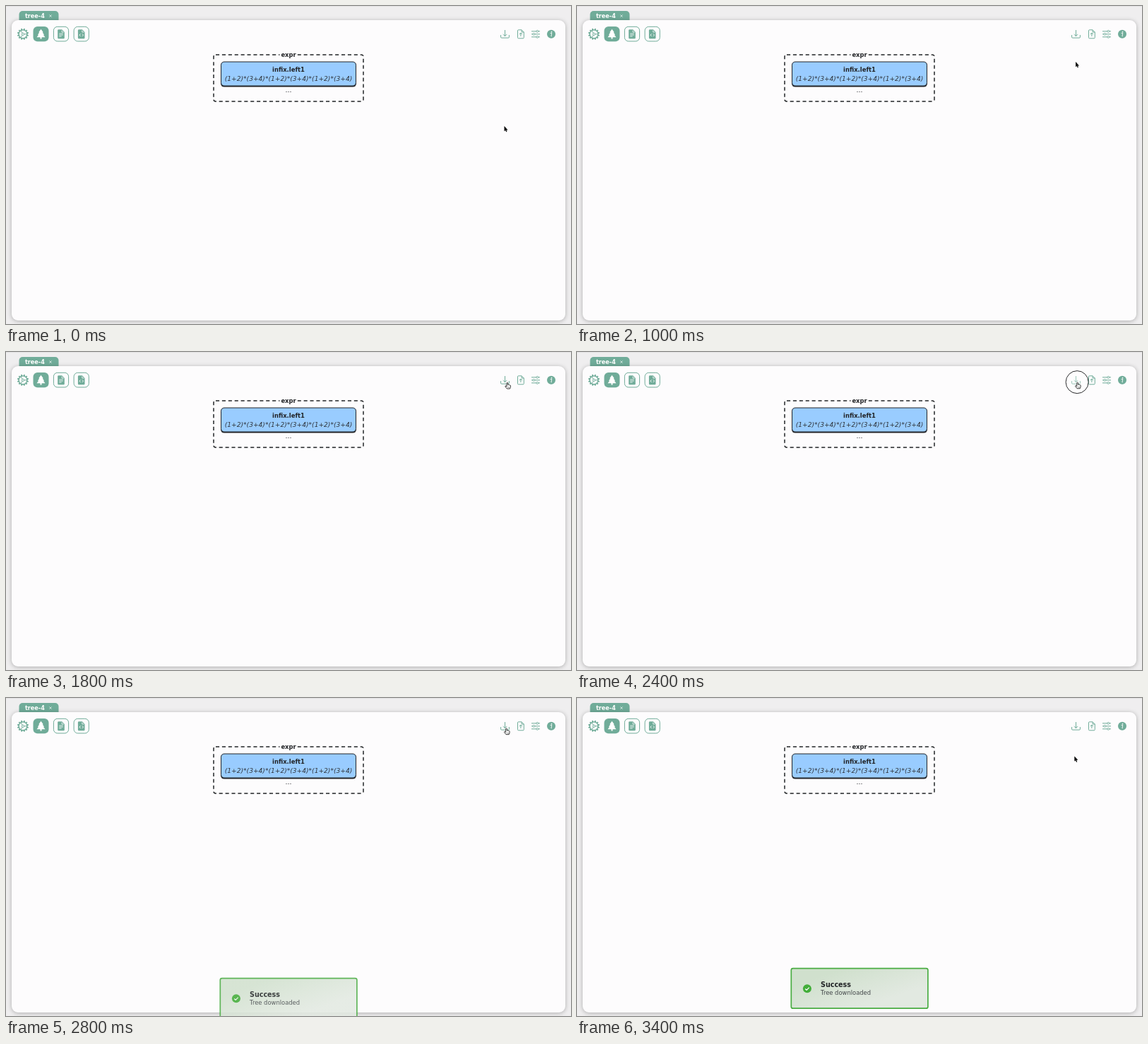
Animation, 800 px wide and 450 px high, one loop 3.7 s. Source, as an HTML page with a canvas:

```html
<!DOCTYPE html>
<html lang="en">
<head>
<meta charset="utf-8">
<title>Tree viewer</title>
<style>
  html, body { margin: 0; width: 100%; height: 100%; overflow: hidden; background: #efeeef; }
  canvas { display: block; width: 800px; height: 450px; }
</style>
</head>
<body>
<canvas id="stage"></canvas>
<script>
const W = 800, H = 450, LOOP = 3700, STEP = 100;
const GREEN = '#70ac99', INK = '#222427', PAPER = '#fdfcfd';
const FONT = '"DejaVu Sans", Verdana, sans-serif';

const canvas = document.getElementById('stage');
const dpr = window.devicePixelRatio || 1;
canvas.width = W * dpr;
canvas.height = H * dpr;
const c = canvas.getContext('2d');

function box(x, y, w, h, r, fill, stroke, lw = 1) {
  c.beginPath();
  c.roundRect(x, y, w, h, r);
  if (fill) { c.fillStyle = fill; c.fill(); }
  if (stroke) { c.strokeStyle = stroke; c.lineWidth = lw; c.stroke(); }
}

function disc(x, y, r, fill, stroke, lw = 1) {
  c.beginPath();
  c.arc(x, y, r, 0, Math.PI * 2);
  if (fill) { c.fillStyle = fill; c.fill(); }
  if (stroke) { c.strokeStyle = stroke; c.lineWidth = lw; c.stroke(); }
}

function line(color, lw, ...pts) {
  c.beginPath();
  for (let i = 0; i < pts.length; i += 2) c.lineTo(pts[i], pts[i + 1]);
  c.strokeStyle = color;
  c.lineWidth = lw;
  c.stroke();
}

function shape(path, x, y, fill, stroke, lw = 1) {
  const p = new Path2D(path);
  c.save();
  c.translate(x, y);
  if (fill) { c.fillStyle = fill; c.fill(p); }
  if (stroke) { c.strokeStyle = stroke; c.lineWidth = lw; c.stroke(p); }
  c.restore();
}

function text(str, x, y, size, color, style = '', align = 'left') {
  c.font = `${style} ${size}px ${FONT}`;
  c.textAlign = align;
  c.fillStyle = color;
  c.fillText(str, x, y);
}

// Piecewise linear track of [time, ...values]
function track(keys, t) {
  if (t <= keys[0][0]) return keys[0].slice(1);
  for (let i = 1; i < keys.length; i++) {
    const a = keys[i - 1], b = keys[i];
    if (t <= b[0]) {
      const k = (t - a[0]) / (b[0] - a[0]);
      return a.slice(1).map((v, n) => v + (b[n + 1] - v) * k);
    }
  }
  return keys[keys.length - 1].slice(1);
}

function drawWindow() {
  c.fillStyle = '#efeeef';
  c.fillRect(0, 0, W, H);
  c.fillStyle = '#e4e3e4';
  c.fillRect(0, 0, W, 1);
  box(18.5, 7, 56, 16, [5, 5, 0, 0], GREEN);
  text('tree-4', 27, 17, 8.1, '#fff', 'bold');
  line('#e8f3ef', 0.8, 61.4, 12.5, 64.6, 15.7);
  line('#e8f3ef', 0.8, 64.6, 12.5, 61.4, 15.7);
  c.save();
  c.shadowColor = 'rgba(0,0,0,.28)';
  c.shadowBlur = 6 * dpr;
  c.shadowOffsetY = dpr;
  box(8, 20, 784, 425, 9, PAPER);
  c.restore();
}

function drawGear(x, y) {
  disc(x, y, 5.9, null, GREEN, 1.4);
  for (let i = 0; i < 12; i++) {
    const a = (i + 0.5) * Math.PI / 6, u = Math.cos(a), v = Math.sin(a);
    line(GREEN, 2, x + u * 6, y + v * 6, x + u * 8, y + v * 8);
  }
  for (let i = 0; i < 3; i++) {
    const a = i * Math.PI * 2 / 3;
    line(GREEN, 1, x, y, x + Math.cos(a) * 5.6, y + Math.sin(a) * 5.6);
  }
  disc(x, y, 1.6, PAPER, GREEN, 0.9);
}

function drawFileButton(x) {
  box(x - 10.6, 29.3, 21.2, 20.6, 5.5, PAPER, GREEN, 1);
  shape('M-3.6 -6.4H1.2L4.8 -2.8V5.2Q4.8 6.5 3.5 6.5H-3.5Q-4.8 6.5 -4.8 5.2V-5.2Q-4.8 -6.4 -3.6 -6.4Z', x, 39.7, GREEN);
  shape('M1.1 -5.3V-2.7H3.8', x, 39.7, null, '#fff', 0.8);
}

function drawToolbar() {
  drawGear(24, 39.8);
  box(38.5, 29, 22, 21.2, 6, GREEN);
  shape('M0 -7L3.3 -2.4H2.2L4.6 1H3.4L6 4.6H1V6.7H-1V4.6H-6L-3.4 1H-4.6L-2.2 -2.4H-3.3Z', 49.5, 39.7, '#fff');

  drawFileButton(78);
  for (const [y, end] of [[39, 80.8], [41, 80.8], [43, 78.6]]) line('#fff', 0.8, 75.2, y, end, y);
  drawFileButton(106.7);
  line('#fff', 0.9, 105.6, 39.3, 103.9, 41.1, 105.6, 42.9);
  line('#fff', 0.9, 107.8, 39.3, 109.5, 41.1, 107.8, 42.9);

  // download
  line(GREEN, 1, 706.5, 34, 706.5, 42.6);
  line(GREEN, 1, 703.8, 40, 706.5, 42.7, 709.2, 40);
  shape('M-5.9 1.2V4.2Q-5.9 5.3 -4.8 5.3H4.8Q5.9 5.3 5.9 4.2V1.2', 706.5, 39.8, null, GREEN);

  // upload file
  shape('M-3.4 -6H1.2L4.4 -2.8V4.9Q4.4 6 3.3 6H-3.3Q-4.4 6 -4.4 4.9V-4.9Q-4.4 -6 -3.4 -6ZM1.2 -6V-2.8H4.4', 728.9, 39.8, null, GREEN, 1);
  line(GREEN, 1, 728.9, 43, 728.9, 38.2);
  line(GREEN, 1, 727, 40, 728.9, 38, 730.8, 40);

  // sliders
  for (const [y, knob] of [[35.8, 752.3], [39.8, 747.4], [43.8, 752.3]]) {
    line(GREEN, 1, 744, y, 756, y);
    disc(knob, y, 1.4, PAPER, GREEN, 0.9);
  }

  disc(772, 39.7, 6, GREEN);
  disc(772.5, 36.7, 0.85, '#fff');
  shape('M-1.3 -1.1H.8L-.1 3H.8', 772, 39.7, null, '#fff', 0.9);
}

function drawNode() {
  c.save();
  c.setLineDash([5.1, 3.8]);
  shape('M3 0H209Q212 0 212 3V63Q212 66 209 66H3Q0 66 0 63V3Q0 0 3 0Z', 294, 69, null, INK, 1.5);
  c.restore();
  c.fillStyle = PAPER;
  c.fillRect(387.4, 66, 25, 6);
  text('expr', 400, 71.8, 8.4, INK, 'bold', 'center');

  box(304, 79.4, 192, 35.2, 5, INK);
  box(304.5, 79, 191, 34, 4.5, '#99ccff', INK, 1);
  text('infix.left1', 400, 93, 8.45, INK, 'bold', 'center');
  text('(1+2)*(3+4)*(1+2)*(3+4)*(1+2)*(3+4)', 400, 106, 9.1, '#30363d', 'italic', 'center');
  text('...', 400, 122, 9.4, INK, '', 'center');
}

function drawToast(t) {
  if (t < 2600) return;
  const [dy, alpha] = track([
    [2500, 68, 0], [2600, 54, 0.25], [2700, 33, 0.62],
    [2800, 14, 0.86], [2900, 4, 0.97], [3000, 0, 1]
  ], t);
  c.save();
  c.globalAlpha = alpha;
  c.translate(0, dy);
  const g = c.createLinearGradient(380, 382, 400, 440);
  g.addColorStop(0, '#d0e0cd');
  g.addColorStop(1, '#e2e9e1');
  box(303.3, 382.6, 193.6, 56.6, 2.5, g, '#4aad43', 1.7);
  disc(325.9, 411.3, 6, '#43ae3a');
  line('#fff', 1.3, 323.2, 411.5, 325.1, 413.4, 328.7, 409.6);
  text('Success', 345, 409, 9.6, INK, 'bold');
  text('Tree downloaded', 345, 420, 8.4, '#43474a');
  c.restore();
}

const ARROW = 'M0 0V7.2L1.6 5.8L2.7 8.3L3.8 7.8L2.7 5.4H4.8Z';
const HAND = 'M-.9 .6Q0 -.6 .8 .6V3.2Q1.6 2.7 2.1 3.4Q2.9 2.9 3.4 3.7Q4.4 3.5 4.5 4.5V6.3L3.6 8.8H-.5L-3 5.6Q-3.2 4.5 -2.2 4.7L-.9 5.7Z';

function drawPointer(t) {
  const [x, y] = track([
    [400, 705.6, 170], [500, 705.6, 166], [600, 705.7, 152], [700, 705.8, 132],
    [800, 705.9, 111], [900, 706, 93], [1000, 706.1, 79], [1100, 706.6, 68],
    [1200, 707.2, 60], [1300, 708, 53], [1400, 709, 47], [1600, 710, 43.6],
    [1800, 709.9, 43.2], [2100, 708.7, 43], [3000, 708.5, 42.8],
    [3100, 708, 46], [3200, 706.5, 62], [3300, 705, 76], [3400, 704.4, 82.4]
  ], t);
  if (t >= 2400 && t < 2600) disc(x - 0.5, y - 0.3, 16, 'rgba(255,255,255,.3)', '#2b2b2d', 1);
  if (y < 48) {
    shape(HAND, x, y, '#fff', '#222', 0.9);
    for (const dx of [0.6, 1.8, 3]) line('#555', 0.5, x + dx, y + 6, x + dx, y + 7.6);
  } else {
    shape(ARROW, x, y, '#111', '#fff', 0.5);
    shape(ARROW, x, y, '#111');
  }
}

function render(t) {
  c.setTransform(dpr, 0, 0, dpr, 0, 0);
  c.lineJoin = 'round';
  drawWindow();
  drawToolbar();
  drawNode();
  drawToast(t);
  drawPointer(t);
}

const start = performance.now();
function tick(now) {
  const t = Math.max(0, now - start) % LOOP;
  render(Math.floor(t / STEP) * STEP);
  requestAnimationFrame(tick);
}
render(0);
requestAnimationFrame(tick);
</script>
</body>
</html>
```
